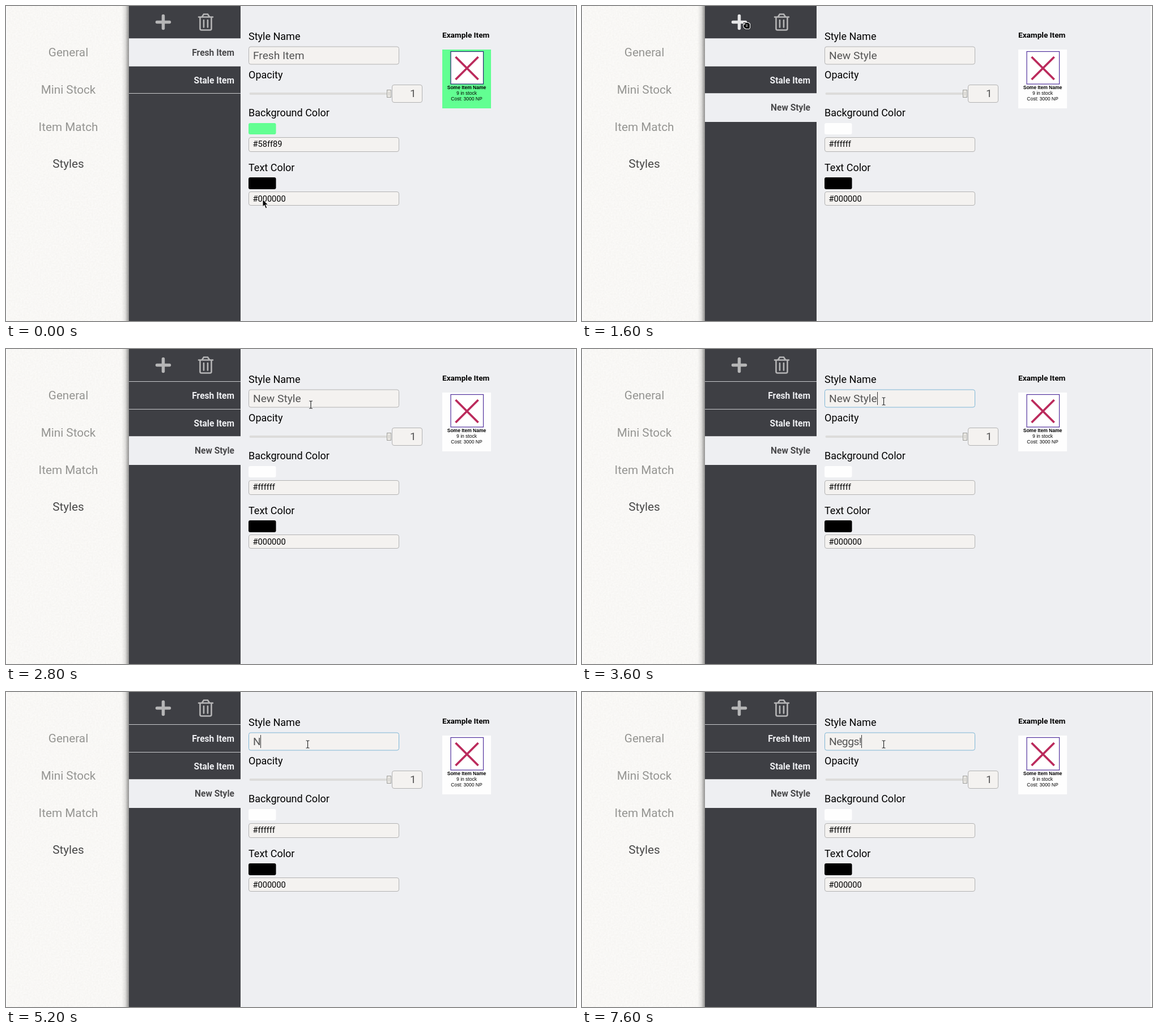
These frames come from a looping animation (1006 by 557 pixels, 8000 ms). An HTML page:

```html
<!DOCTYPE html>
<html lang="en">
<head>
<meta charset="utf-8">
<title>Style editor</title>
<style>
html, body { margin: 0; width: 100%; height: 100%; overflow: hidden; background: #fcfcfc; }
svg { display: block; }
text { font-family: Roboto, "Noto Sans", sans-serif; white-space: pre; }
.nav text { font-size: 20.7px; fill: #959592; text-anchor: middle; }
.side text { font-size: 15.6px; font-weight: 700; fill: #eeeff2; text-anchor: end; }
.label text { font-size: 18px; }
.field { fill: #f4f2f0; stroke: #b2b2b2; }
.value { font-size: 19.2px; fill: #555; }
.hex { font-size: 14.6px; }
.card text { font: 8.5px "Liberation Sans", Arial, sans-serif; text-anchor: middle; }
.cursor { stroke-linejoin: round; }
</style>
</head>
<body>
<svg width="1006" height="557" viewBox="0 0 1006 557">
  <defs>
    <linearGradient id="shade">
      <stop offset="0" stop-color="#000" stop-opacity="0"/>
      <stop offset=".5" stop-color="#000" stop-opacity=".1"/>
      <stop offset="1" stop-color="#000" stop-opacity=".42"/>
    </linearGradient>
    <filter id="paper" x="0" y="0" width="1" height="1">
      <feTurbulence type="fractalNoise" baseFrequency=".35" numOctaves="2" seed="4"/>
      <feColorMatrix values="0 0 0 0 .45  0 0 0 0 .43  0 0 0 0 .38  .13 0 0 0 -.03"/>
    </filter>
  </defs>

  <rect x="2" width="215" height="557" fill="#fbfaf8"/>
  <rect x="2" width="215" height="557" filter="url(#paper)"/>
  <rect x="204" width="13" height="557" fill="url(#shade)"/>
  <g class="nav">
    <text x="110" y="88.5">General</text>
    <text x="110" y="154.5">Mini Stock</text>
    <text x="110" y="220.5">Item Match</text>
    <text x="110" y="286" style="fill:#484848">Styles</text>
  </g>

  <rect x="414" width="589.5" height="557" fill="#eeeff2"/>
  <g class="side">
    <rect x="217" width="197" height="557" fill="#3e3f44"/>
    <rect id="freshRow" x="217" y="57" width="197" height="50"/>
    <path d="M217 57.5h197M217 106.5h197M217 154.5h197" stroke="#c9cacd"/>
    <text id="fresh" x="403" y="87.5">Fresh Item</text>
    <text x="403" y="136.5">Stale Item</text>
    <g id="newRow">
      <rect x="217" y="155" width="197" height="50" fill="#eeeff2"/>
      <text x="403" y="185" style="fill:#4a4a4c">New Style</text>
    </g>
    <path id="plus" d="M277.5 17.5v22M266.5 28.5h22" stroke-width="5.5" stroke-linecap="round"/>
    <path d="M340 19.5h25M346 19l3-4.5h7l3 4.500M342.500 20v20q0 2.500 2.500 2.500h15q2.500 0 2.500-2.500V20M349 25v12.500M356 25v12.500"
      fill="none" stroke="#b5b5b6" stroke-width="2.600" stroke-linecap="round"/>
  </g>

  <g class="label">
    <text x="428" y="60">Style Name</text>
    <text x="428" y="128">Opacity</text>
    <text x="428" y="195">Background Color</text>
    <text x="428" y="292">Text Color</text>
  </g>
  <rect id="nameBox" class="field" x="428.500" y="72" width="265" height="31" rx="3.500"/>
  <rect id="selection" x="436" y="76" width="85" height="23" fill="#3eab7b"/>
  <text id="name" class="value" x="436" y="94"></text>
  <rect id="caret" y="76" width="1" height="23" fill="#333"/>

  <rect x="429.500" y="153" width="246" height="4" rx="2" fill="#dcdcda"/>
  <rect x="672.500" y="148.500" width="7" height="13" fill="#e9e7e3" stroke="#a0a09c"/>
  <path d="M676 152v6" stroke="#b8b7b3"/>
  <rect class="field" x="681.500" y="139.500" width="53" height="31" rx="3.500"/>
  <text class="value" x="713" y="161">1</text>

  <rect id="swatch" x="428" y="207" width="48.500" height="20" rx="3"/>
  <rect class="field" x="428.500" y="232.500" width="265" height="25" rx="3.500"/>
  <text id="hex" class="hex" x="435.500" y="249"></text>
  <rect x="428" y="303" width="48.500" height="21" rx="3"/>
  <rect class="field" x="428.500" y="328.500" width="265" height="24" rx="3.500"/>
  <text class="hex" x="435.500" y="346">#000000</text>

  <text x="770" y="55.500" font-size="13.600" font-weight="700">Example Item</text>
  <g class="card">
    <rect id="card" x="770" y="77" width="86" height="104"/>
    <rect id="frame" x="785" y="80.500" width="57.500" height="57.500" fill="#fff" stroke-width="1.200"/>
    <path d="M793.500 90l40 40M833.500 90l-40 40" stroke="#bb2a5c" stroke-width="3.800"/>
    <text x="813" y="147" style="font-weight:700">Some Item Name</text>
    <text x="813" y="157">9 in stock</text>
    <text x="813" y="166.500">Cost: 3000 NP</text>
  </g>

  <path id="arrow" class="cursor" d="M0 0v13l3-2.700 2.300 5.500 2.400-1-2.300-5.300h4.200z" stroke="#fff" stroke-width=".9"/>
  <path id="hand" class="cursor" d="M-3.500 0.500q-1.500 2 .500 2.500h3l-3.500 2.500 1 4.500 3.500 2.500h6l1.500-2V3.500L6 1.500z M1 5.500h3.500M1 8h3.500"
    stroke="#fff" stroke-width="1.100"/>
  <g id="beam" fill="none">
    <path d="M-3-6.500h2.200l.8.800.8-.8H3M0-5.700V5.700M-3 6.500h2.200l.8-.8.8.8H3" stroke="#fff" stroke-width="2.600"/>
    <path d="M-3-6.500h2.200l.8.800.8-.8H3M0-5.700V5.700M-3 6.500h2.200l.8-.8.8.8H3" stroke="#222" stroke-width="1.200"/>
  </g>
</svg>
<script>
const $ = id => document.getElementById(id);
const show = (id, on) => $(id).style.display = on ? "" : "none";
const last = (list, t) => list.filter(k => k[0] <= t).pop();
const mix = (a, b, p) => `rgb(${a.map((v, i) => v + (b[i] - v) * Math.max(0, Math.min(1, p)))})`;

// time, pointer, x, y
const moves = [
  [0, "arrow", 453, 342], [200, "arrow", 450, 336], [500, "arrow", 410, 245], [600, "arrow", 368, 157],
  [800, "arrow", 362, 146], [900, "hand", 338, 100], [1000, "hand", 308, 54], [1100, "hand", 292, 33],
  [1200, "hand", 288, 28], [1900, "hand", 296, 34], [2000, "arrow", 345, 68], [2100, "arrow", 420, 122],
  [2200, "arrow", 483, 158], [2300, "arrow", 508, 171], [2500, "arrow", 515, 158], [2600, "arrow", 527, 127],
  [2700, "beam", 536, 103], [2800, "beam", 538, 98.5], [3400, "beam", 537, 97], [3500, "beam", 534.500, 94.500],
  [3600, "beam", 532.500, 92.500]
];
const names = [
  [0, "Fresh Item"], [1500, "New Style"], [5200, "N"], [6000, "Neg"], [6100, "Negs"],
  [7100, "Neg"], [7200, "Neggs"], [7600, "Neggs!"]
];
const caretOn = [[3100, 3700], [4300, 4500], [5200, 5800], [6000, 8000]];

function draw(t) {
  const added = t >= 1500, typing = t >= 5200, selected = t >= 4500 && !typing;
  const [, pointer, x, y] = last(moves, t);
  for (const id of ["arrow", "hand", "beam"]) show(id, id === pointer);
  $(pointer).setAttribute("transform", `translate(${x} ${y})`);
  $("plus").setAttribute("stroke", t >= 1100 && t < 2000 ? "#e6e6e7" : "#b5b5b6");

  const fade = Math.max(0, Math.min(1, (t - 1600) / 300));
  $("freshRow").setAttribute("fill", mix([238, 239, 242], [62, 63, 68], 1 - (1 - fade) ** 2.6));
  $("fresh").style.fill = added ? "#eeeff2" : "#4a4a4c";
  show("newRow", added);

  const color = added ? "#fefefe" : "#62ff92";
  $("swatch").setAttribute("fill", color);
  $("card").setAttribute("fill", color);
  $("frame").setAttribute("stroke", added ? "#50309c" : "#20286e");
  $("hex").textContent = added ? "#ffffff" : "#58ff89";

  $("nameBox").style.stroke = mix([178, 178, 178], [126, 182, 214], (t - 2900) / 300);
  const name = $("name");
  name.textContent = last(names, t)[1];
  name.style.letterSpacing = typing ? "-.5px" : "0";
  name.style.fill = selected ? "#f4f4f4" : "";
  show("selection", selected);
  show("caret", caretOn.some(([a, b]) => t >= a && t < b));
  $("caret").setAttribute("x", Math.round(436 + name.getComputedTextLength()));
}

const start = performance.now();
function tick() {
  const t = (performance.now() - start) % 8000;
  draw(Math.floor(t / 100) * 100);
  requestAnimationFrame(tick);
}
tick();
</script>
</body>
</html>
```
